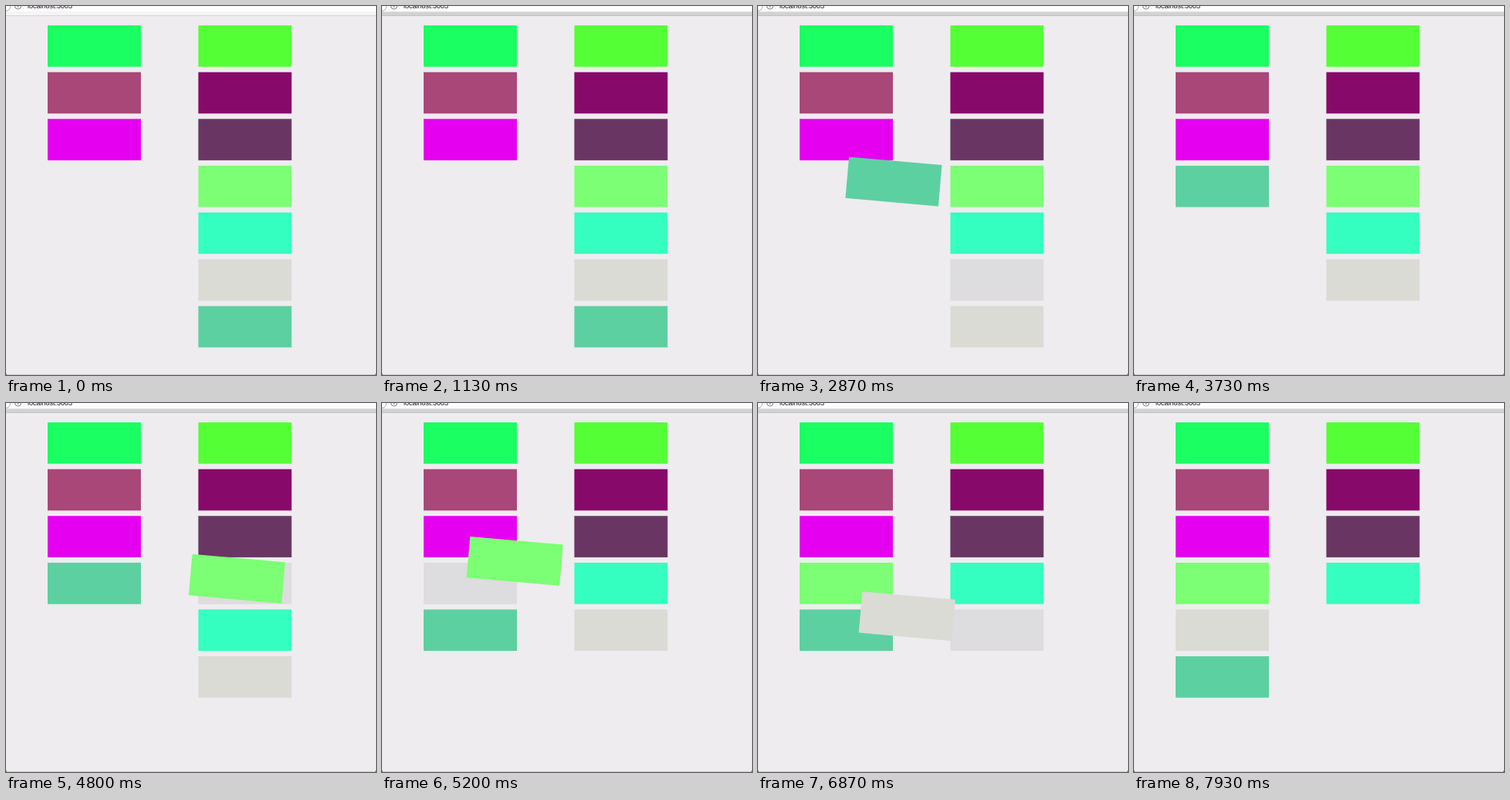
Recreate the animation shown at these times as an HTML page with a canvas. Size 480 px wide and 478 px high, loop 8 s.

```html
<!DOCTYPE html>
<html lang="en">
<head>
<meta charset="utf-8">
<title>Draggable lists</title>
<style>
  html, body { margin: 0; width: 100%; height: 100%; overflow: hidden; background: #eeecef; }
  canvas { display: block; width: 480px; height: 478px; }
</style>
</head>
<body>
<canvas id="stage" width="480" height="478"></canvas>
<script>
const ctx = document.getElementById('stage').getContext('2d');
const LOOP = 8000;
const DRAG_TIME = 800;
const TILT = 5 * Math.PI / 180;
const CARD = { w: 121, h: 53.6, top: 25.1, step: 60.6, columns: [54, 249.5] };
const LEFT_EDGE = CARD.columns[0] + CARD.w;
const TEAL = '#5dd0a1', LIME = '#7cff74', GRAY = '#dadbd5', PLACEHOLDER = '#dddcde';

const LEFT = ['#1aff62', '#a84778', '#e600f0'];
const RIGHT = ['#55ff36', '#870a6b', '#693663', LIME, '#34ffc0', GRAY, TEAL];

// Each card is carried from the right list to index `to` of the left one, arching up by `lift`.
const DRAGS = [
  { card: TEAL, start: 2370, to: 3, lift: 76 },
  { card: LIME, start: 4689, to: 3, lift: 36 },
  { card: GRAY, start: 6419, to: 4, lift: 19 }
];

const mix = (a, b, k) => a + (b - a) * k;
const smooth = p => p * p * (3 - 2 * p);
const centerX = column => CARD.columns[column] + CARD.w / 2;
const centerY = index => CARD.top + index * CARD.step + CARD.h / 2;

function box(x, y, w, h, color) {
  ctx.fillStyle = color;
  ctx.fillRect(x, y, w, h);
}

function drawCard(x, y, color) {
  box(x, y, CARD.w, CARD.h, color);
}

function drawWindow(focused) {
  box(0, 0, 480, 478, '#eeecef');
  box(0, 0, 480, 7.5, '#fdfdfd');
  box(0, 7.5, 480, 4.5, focused ? '#d2d1d4' : '#f7f4f7');
  box(0, 12, 480, 1, focused ? '#c2c0c4' : '#d8d5d9');

  ctx.lineWidth = 1;
  ctx.strokeStyle = '#aaa';
  ctx.beginPath();
  ctx.moveTo(0, 6.5);
  ctx.quadraticCurveTo(5, 6, 6, 0);
  ctx.stroke();
  ctx.strokeStyle = '#777';
  ctx.beginPath();
  ctx.arc(15.5, 0, 4, 0, 7);
  ctx.stroke();
  box(15, -2, 1, 4, '#777');

  ctx.fillStyle = '#111';
  ctx.font = '9px "Liberation Sans", sans-serif';
  ctx.fillText('localhost:3003', 28, 3);

  box(0, 477.5, 480, .5, '#aaa8ac');
  for (const x of [0, 479]) box(x, 476, 1, 2, '#88868a');
}

function draw(t) {
  const left = [...LEFT], right = [...RIGHT];
  let held = null;

  for (const { card, start, to, lift } of DRAGS) {
    if (t < start) break;
    const home = right.indexOf(card);
    right.splice(home, 1);
    const p = Math.min(1, (t - start) / DRAG_TIME);
    const k = smooth(p);
    const x = mix(centerX(1), centerX(0), k);
    const y = mix(centerY(home), centerY(to), k) - lift * Math.sin(Math.PI * k);
    const filler = p < 1 ? PLACEHOLDER : card;
    const climbed = y < centerY(home) - CARD.step;
    if (x < LEFT_EDGE) left.splice(to, 0, filler);
    else right.splice(home - climbed, 0, filler);
    if (p < 1) held = { card, x, y };
  }

  drawWindow(t >= 70);
  [left, right].forEach((list, column) => list.forEach((color, i) =>
    drawCard(CARD.columns[column], CARD.top + i * CARD.step, color)));

  if (held) {
    ctx.save();
    ctx.translate(held.x, held.y);
    ctx.rotate(TILT);
    drawCard(-CARD.w / 2, -CARD.h / 2, held.card);
    ctx.restore();
  }
}

const begin = performance.now();
function tick() {
  draw((performance.now() - begin) % LOOP);
  requestAnimationFrame(tick);
}
tick();
</script>
</body>
</html>
```
